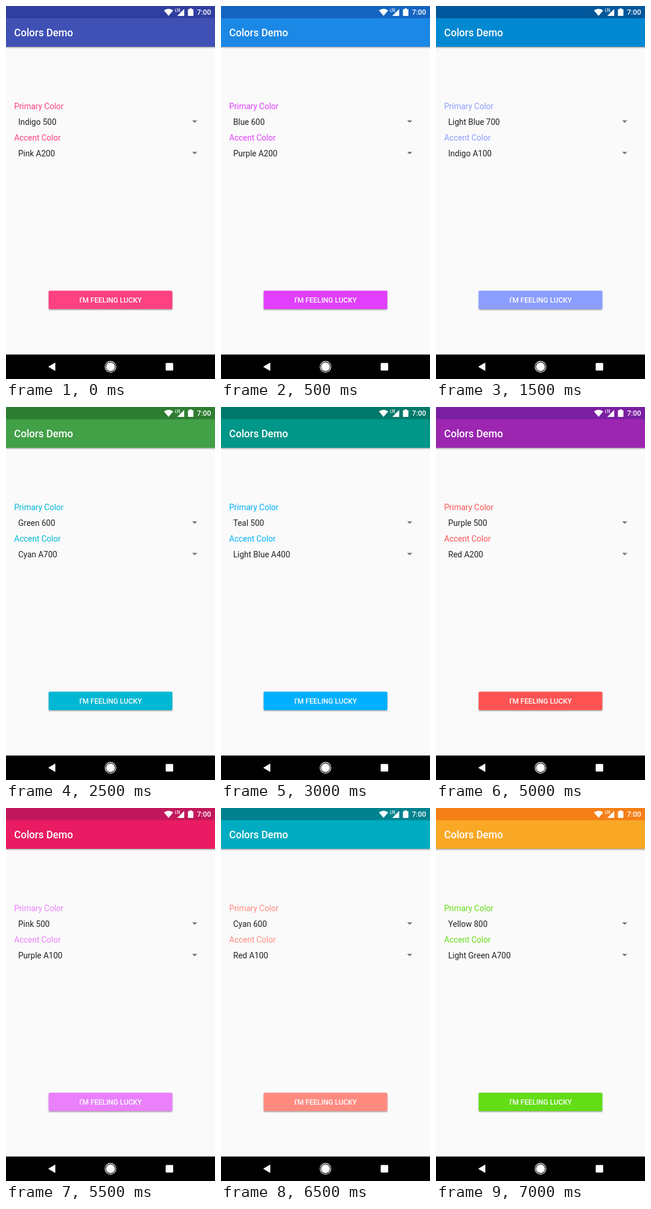
Write an HTML page that moves like this. It is 360 px wide and 640 px high and loops after 7500 ms.

```html
<!DOCTYPE html>
<html lang="en">
<head>
<meta charset="utf-8">
<title>Colors Demo</title>
<style>
  html, body { margin: 0; width: 100%; height: 100%; overflow: hidden; background: #fafafa; }
  svg { display: block; width: 100vw; height: 100vh; font: 14px Roboto, sans-serif; }
  .medium { font-weight: 500; }
</style>
</head>
<body>
<svg viewBox="0 0 360 640">
  <defs>
    <filter id="barShadow" x="-5%" y="-20%" width="110%" height="150%">
      <feDropShadow dx="0" dy="1.4" stdDeviation="1.3" flood-opacity=".38"/>
    </filter>
    <filter id="buttonShadow" x="-5%" y="-20%" width="110%" height="150%">
      <feDropShadow dx="0" dy="1.4" stdDeviation="1" flood-opacity=".4"/>
    </filter>
    <path id="arrow" d="M320.6 -2.2h8.8l-4.4 4.4z" fill="#757575"/>
  </defs>

  <rect width="360" height="640" fill="#fafafa"/>
  <rect id="toolbar" x="-10" y="21" width="380" height="49" filter="url(#barShadow)"/>
  <rect id="status" width="360" height="21"/>

  <g fill="#fff">
    <path d="M272 7.6Q280 2 288 7.6L280 17z"/>
    <path d="M295 17L307 5V17z"/>
    <path d="M314.2 5.5h2.1V4h3.6v1.5h2.1q.8 0 .8.8v10q0 .8-.8.8h-7.8q-.8 0-.8-.8v-10q0-.8.8-.8z"/>
    <path d="M292 4.6v5.2h2M294.2 5h2.9M295.6 5v5M300 5h-2v4.7h2M298 7.3h1.8" fill="none" stroke="#fff" stroke-width=".9"/>
    <text class="medium" x="329" y="15.3" font-size="12.25">7:00</text>
    <text class="medium" x="14" y="52.2" font-size="17.5">Colors Demo</text>
  </g>

  <g id="labels">
    <text x="14" y="177">Primary Color</text>
    <text x="14" y="231">Accent Color</text>
  </g>
  <g fill="#000" fill-opacity=".87">
    <text id="primaryName" x="21" y="204"></text>
    <text id="accentName" x="21" y="258"></text>
  </g>
  <use href="#arrow" y="198.4"/>
  <use href="#arrow" y="252.4"/>

  <rect id="button" x="73.5" y="488.5" width="213" height="31.5" rx="1.75" filter="url(#buttonShadow)"/>
  <text class="medium" x="180" y="509" font-size="12.25" text-anchor="middle" fill="#fff">I'M FEELING LUCKY</text>

  <rect y="594" width="360" height="4" fill="#fff"/>
  <rect y="598" width="360" height="42"/>
  <g fill="#fff" stroke="#fff" stroke-linejoin="round">
    <path d="M73.5 619L84.5 612.5V625.5z"/>
    <circle cx="180" cy="619" r="7.6" stroke="none"/>
    <circle cx="180" cy="619" r="9.3" fill="none" stroke-width="1.2"/>
    <rect x="275.5" y="613" width="12" height="12" rx=".5"/>
  </g>
</svg>
<script>
  const STEP = 500;

  // primary name, toolbar, status bar, accent name, accent
  const themes = [
    ["Indigo 500", "#3f51b5", "#303f9f", "Pink A200", "#ff4081"],
    ["Blue 600", "#1e88e5", "#1565c0", "Purple A200", "#e040fb"],
    ["Indigo 400", "#5c6bc0", "#3949ab", "Blue A200", "#448aff"],
    ["Light Blue 700", "#0288d1", "#01579b", "Indigo A100", "#8c9eff"],
    ["Green 600", "#43a047", "#2e7d32", "Blue A100", "#82b1ff"],
    ["Green 600", "#43a047", "#2e7d32", "Cyan A700", "#00b8d4"],
    ["Teal 500", "#009688", "#00796b", "Light Blue A400", "#00b0ff"],
    ["Blue 700", "#1976d2", "#0d47a1", "Indigo A200", "#536dfe"],
    ["Cyan 800", "#00838f", "#006064", "Purple A400", "#d500f9"],
    ["Cyan 700", "#0097a7", "#006064", "Pink A100", "#ff80ab"],
    ["Purple 500", "#9c27b0", "#7b1fa2", "Red A200", "#ff5252"],
    ["Pink 500", "#e91e63", "#c2185b", "Purple A100", "#ea80fc"],
    ["Purple 400", "#ab47bc", "#8e24aa", "Pink A100", "#ff80ab"],
    ["Cyan 600", "#00acc1", "#00838f", "Red A100", "#ff8a80"],
    ["Yellow 800", "#f9a825", "#f57f17", "Light Green A700", "#64dd17"]
  ];

  const byId = id => document.getElementById(id);
  const paint = (id, color) => byId(id).setAttribute("fill", color);
  let shown = -1;

  function render(time) {
    const index = Math.floor(time / STEP) % themes.length;
    if (index === shown) return;
    shown = index;
    const [primaryName, primary, dark, accentName, accent] = themes[index];
    paint("toolbar", primary);
    paint("status", dark);
    paint("labels", accent);
    paint("button", accent);
    byId("primaryName").textContent = primaryName;
    byId("accentName").textContent = accentName;
  }

  const start = performance.now();
  function tick() {
    render(performance.now() - start);
    requestAnimationFrame(tick);
  }
  tick();
</script>
</body>
</html>
```
